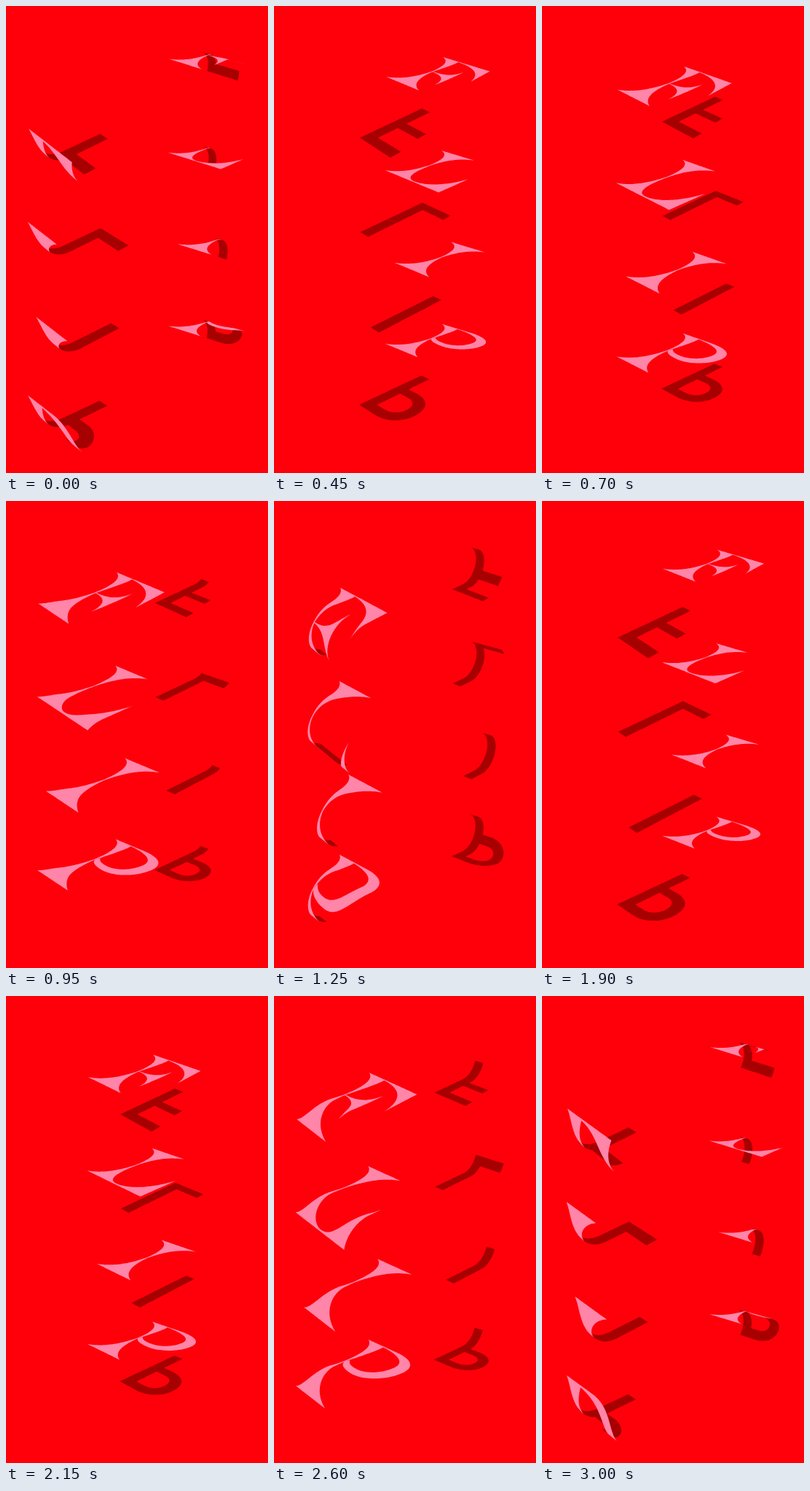
An HTML page with a canvas that plays this animation: 360 px wide and 640 px high, repeating every 3050 ms.

```html
<!DOCTYPE html>
<html lang="en">
<head>
<meta charset="utf-8">
<title>Flip</title>
<style>
  html, body { margin: 0; width: 100%; height: 100%; overflow: hidden; background: #ff000a; }
  canvas { display: block; width: 360px; height: 640px; }
</style>
</head>
<body>
<canvas role="img" aria-label="FLIP"></canvas>
<script>
const W = 360, H = 640, LOOP = 3050, STEP = 50;
const PINK = '#ff85a9', DARK = '#a60000', RED = '#ff000a';

// Belt in cap heights: two straights joined by half circles.
const LEFT = -0.872, RIGHT = 1.38, R = 0.278;
const HALF = RIGHT - LEFT + Math.PI * R;

// Belt positions where the visible face changes.
const EDGE_L = LEFT - R * 2.136, EDGE_R = RIGHT + R * 0.368;

// Belt travel over time: [ms, distance].
const TRAVEL = [[0, 0], [450, 0.885], [950, 1.907], [1600, 3.208],
  [2150, 4.4315], [2600, 5.256], [3000, 6.147], [LOOP, 2 * HALF]];

// Outlines in hundredths of the cap height, baseline at 0, y upwards.
const STEM_LEFT = 'M0 0C13 6 23.5 18 25 50C23.5 82 13 94 0 100';
const STEM_FOOT = 'C28.5 18 39 6 52 0Z';
const STEM_HEAD = 'L52 100C39 94 28.5 82 26.5 50';
const COUNTER = 'C29 90 28 75 26.5 50';

const ROWS = [
  { y: 0, shift: 0,
    serif: STEM_LEFT + 'L73 100L76 56C72 80 56 97 27 98.5' + COUNTER + STEM_FOOT +
      'M25 50.5C46 50.5 52 58 53 75C54.5 62 55 38 54 23C52 40 44 49.5 25 49.5Z',
    sans: 'M10 0L10 100L61 100L61 85.5L24 85.5L24 55.5L56 55.5L56 41.5L24 41.5L24 0Z' },
  { y: 128.7, shift: -0.02,
    serif: STEM_LEFT + STEM_HEAD + 'C26.5 30 28 2 45 2C62 2 76 18 82 49L81 0Z',
    sans: 'M11 0L11 100L24.5 100L24.5 14L57.5 14L57.5 0Z' },
  { y: 250, shift: 0.143,
    serif: STEM_LEFT + STEM_HEAD + STEM_FOOT,
    sans: 'M29.5 0L29.5 100L43 100L43 0Z' },
  { y: 366.3, shift: -0.015,
    serif: STEM_LEFT + 'L45 100C70 100 81 89 81 75C81 56 67 41 50 41C39 41 29 44 26.5 50' +
      'L27.5 56C32 51 37 49.5 46 49.5C59 50 68.5 60 68.5 76C68 89 54 97 27 98.5' + COUNTER + STEM_FOOT,
    sans: 'M9 0L9 100L36 100C55 100 67 87 67 68.5C67 50 55 37 36 37L23 37L23 0Z' +
      'M23 51L36 51C46.5 51 53 58 53 68.5C53 79 46.5 86 36 86L23 86Z' }
];

// Turns path text into finely divided [u, v] polygons.
function flatten(path, shift) {
  const polys = [];
  let poly, pen;
  const curve = (a, b, c, d) => {
    for (let i = 1; i <= 28; i++) {
      const t = i / 28, k = 1 - t;
      poly.push([0, 1].map(j =>
        k * k * k * a[j] + 3 * k * k * t * b[j] + 3 * k * t * t * c[j] + t * t * t * d[j]));
    }
    pen = d;
  };
  const line = to => {
    const mix = t => pen.map((v, j) => v + (to[j] - v) * t);
    curve(pen, mix(1 / 3), mix(2 / 3), to);
  };
  for (const [, op, args] of path.matchAll(/([MLCZ])([^MLCZ]*)/g)) {
    const n = args.trim().split(/\s+/).map(v => v / 100);
    if (op === 'M') polys.push(poly = [pen = [n[0] + shift, n[1]]]);
    if (op === 'L') line([n[0] + shift, n[1]]);
    if (op === 'C') curve(pen, [n[0] + shift, n[1]], [n[2] + shift, n[3]], [n[4] + shift, n[5]]);
    if (op === 'Z') line(poly[0]);
  }
  return polys;
}

for (const row of ROWS) {
  row.front = flatten(row.serif, row.shift);
  row.back = flatten(row.sans, 0);
}

// Keeps the part of a polygon on one side of v = limit.
function clip(poly, limit, sign) {
  const out = [];
  poly.forEach((b, i) => {
    const a = poly[(i || poly.length) - 1];
    const da = (a[1] - limit) * sign, db = (b[1] - limit) * sign;
    if (da * db < 0) out.push([a[0] + (b[0] - a[0]) * da / (da - db), limit]);
    if (db >= 0) out.push(b);
  });
  return out;
}

// Position along the belt to [p, h]: along the straight, and depth below the top.
function bend(s) {
  if (s >= LEFT && s <= RIGHT) return [s, 0];
  const side = s > RIGHT ? 1 : -1;
  const end = side > 0 ? RIGHT : LEFT;
  const past = (s - end) * side, angle = past / R;
  if (angle > Math.PI) return [end - side * (past - Math.PI * R), 2 * R];
  return [end + side * R * Math.sin(angle), R * (1 - Math.cos(angle))];
}

function project(u, s) {
  const [p, h] = bend(s);
  const w = 1 + 0.1645 * p - 0.1703 * u + 0.1173 * h;
  return [(154 + 115.97 * p + 52.79 * u + 21.11 * h) / w,
          (97 - 15.63 * p + 16.18 * u + 122.93 * h) / w];
}

const canvas = document.querySelector('canvas');
const ctx = canvas.getContext('2d');
const ratio = window.devicePixelRatio || 1;
canvas.width = W * ratio;
canvas.height = H * ratio;

function fill(polys, start, top, color) {
  ctx.fillStyle = color;
  ctx.beginPath();
  for (const poly of polys) {
    if (poly.length < 3) continue;
    poly.forEach(([u, v], i) => {
      const [x, y] = project(u, start + v);
      if (i) ctx.lineTo(x, y + top); else ctx.moveTo(x, y + top);
    });
    ctx.closePath();
  }
  ctx.fill();
}

function travel(t) {
  const i = TRAVEL.findIndex(k => k[0] > t);
  const [t0, d0] = TRAVEL[i - 1], [t1, d1] = TRAVEL[i];
  return d0 + (d1 - d0) * (t - t0) / (t1 - t0);
}

function draw(t) {
  const from = -3.4, span = 2 * HALF;
  const starts = [0, HALF].map(offset => {
    const s = 0.885 - travel(t) + offset - from;
    return from + ((s % span) + span) % span;
  });
  ctx.setTransform(ratio, 0, 0, ratio, 0, 0);
  ctx.fillStyle = RED;
  ctx.fillRect(0, 0, W, H);
  for (const row of ROWS) {
    for (const s of starts) {
      fill(row.back.map(p => clip(p, EDGE_L - s, -1)), s, row.y, DARK);
      fill(row.back.map(p => clip(p, EDGE_R - s, 1)), s, row.y, DARK);
    }
    for (const s of starts) {
      fill(row.front.map(p => clip(clip(p, EDGE_L - s, 1), EDGE_R - s, -1)), s, row.y, PINK);
    }
  }
}

function tick() {
  const t = performance.now() % LOOP;
  draw(Math.floor(t / STEP) * STEP);
  requestAnimationFrame(tick);
}
tick();
</script>
</body>
</html>
```
